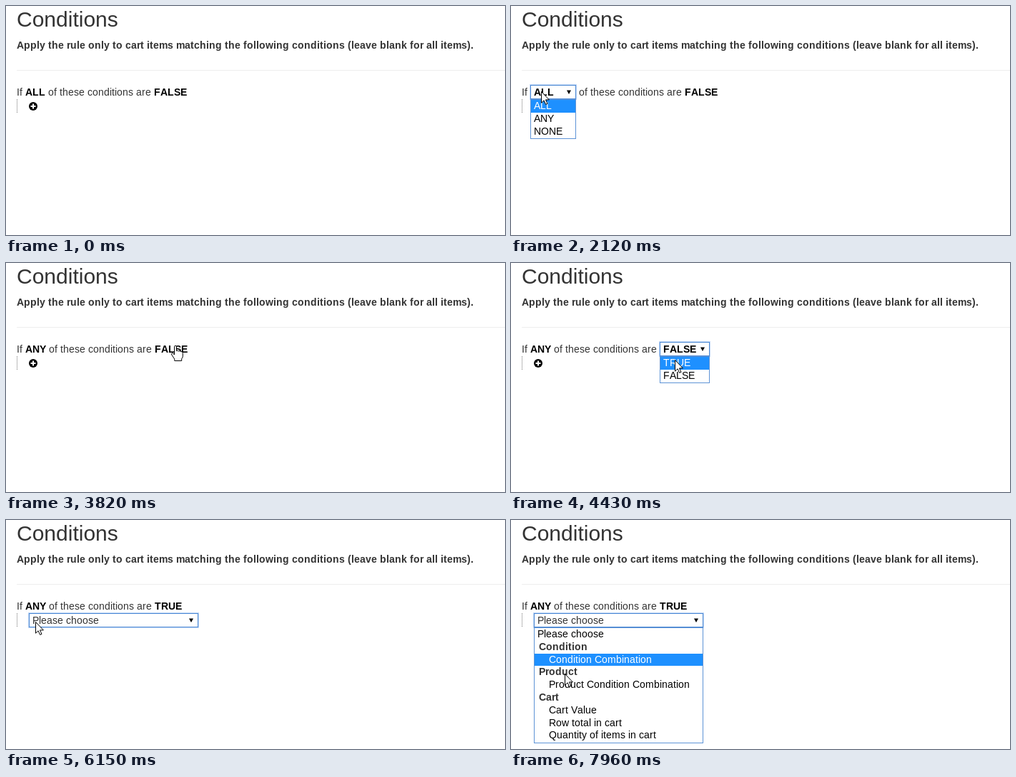
Recreate the animation shown at these times as an HTML page. Size 698x322 px, loop 8000 ms.

```html
<!DOCTYPE html>
<html lang="en">
<head>
<meta charset="utf-8">
<title>Conditions</title>
<style>
  html, body { margin: 0; width: 100%; height: 100%; overflow: hidden; background: #fff; }
  svg { display: block; font: 14px "Liberation Sans", Arial, sans-serif; }
  text { white-space: pre; fill: #333; }
  .b { font-weight: bold; }
  .k { fill: #000; }
  .w { fill: #fff; }
  rect { shape-rendering: crispEdges; }
</style>
</head>
<body>
<svg width="698" height="322" viewBox="0 0 698 322">
  <text x="15" y="29" font-size="30">Conditions</text>
  <g id="intro"></g>
  <rect x="15" y="90" width="683" height="1" fill="#eee"/>
  <path d="M15.5 131V151" stroke="#777" stroke-dasharray="1 1"/>
  <g id="form"></g>
  <g id="cursor" stroke="#000" fill="#fff" stroke-linejoin="round">
    <path id="arrow" d="M.5 .5V16.2L4.1 12.8 6.6 18.4 9 17.4 6.5 11.9H11.4Z"/>
    <path id="hand" d="M-1.5 13V1.8a1.5 1.5 0 0 1 3 0V7.5q1.5-1.2 3 .4 1.6-.9 3 .6 2.8-.4 2.8 2V15q0 2-1.6 3.6V21.5H-1.2V19.2L-5.2 13q-.9-2 .8-2.4 1.2-.2 2.9 2.4Z"/>
  </g>
</svg>
<script>
const LOOP = 8000;
const TICK = 77;   // the pointer moves once per tick
const ROW = 17.8;  // height of a list row
const $ = id => document.getElementById(id);
const pen = document.createElement('canvas').getContext('2d');

const MODES = ['ALL', 'ANY', 'NONE'];
const VALUES = ['TRUE', 'FALSE'];
// '#' marks a group title, '>' a member of a group
const KINDS = ['Please choose', '#Condition', '>Condition Combination', '#Product',
  '>Product Condition Combination', '#Cart', '>Cart Value', '>Row total in cart',
  '>Quantity of items in cart'];

// Each entry either brings the pointer to a point or changes the form
const SCRIPT = [
  { at: 0, mode: 'ALL', value: 'FALSE', field: '', open: false },
  { at: 1090, to: [33, 112] },
  { at: 1470, to: [42, 120] },
  { at: 1710, field: 'mode' },
  { at: 2120, open: true },
  { at: 2410, to: [45, 160] },
  { at: 2740, mode: 'ANY', open: false },
  { at: 3200, to: [112, 175] },
  { at: 3280, field: '' },
  { at: 3510, to: [174, 156] },
  { at: 3820, to: [237, 116] },
  { at: 4050, field: 'value' },
  { at: 4280, open: true },
  { at: 4430, to: [229, 136] },
  { at: 4830, to: [232, 146] },
  { at: 5140, value: 'TRUE', open: false },
  { at: 5530, to: [150, 154] },
  { at: 5530, field: '' },
  { at: 6000, to: [41, 143] },
  { at: 6150, field: 'kind' },
  { at: 6470, open: true },
  { at: 6960, to: [69, 187] },
  { at: 7490, to: [73, 213] },
  { at: 7960, to: [75, 216] }
];

// Longer ways take more ticks
function pointer(t) {
  let x = 263, y = 355;
  for (const { at, to } of SCRIPT) {
    if (!to) continue;
    const dx = to[0] - x, dy = to[1] - y;
    const ticks = Math.round((150 + 1.6 * Math.hypot(dx, dy)) / TICK);
    const left = Math.max(0, Math.ceil((at - t) / TICK));
    if (left >= ticks) break;
    const p = 1 - (left / ticks) ** 1.5;
    x += dx * p;
    y += dy * p;
  }
  return [Math.round(x), Math.round(y)];
}

const stateAt = t => Object.assign({}, ...SCRIPT.filter(s => !s.to && s.at <= t));

// Whole-pixel advance of one 14px glyph
function advance(ch, bold) {
  pen.font = (bold ? 'bold ' : '') + '1400px "Liberation Sans", Arial, sans-serif';
  return Math.round(pen.measureText(ch).width / 100);
}

function text(x, y, str, cls = '') {
  const xs = [];
  for (const ch of str) {
    xs.push(x);
    x += advance(ch, cls.includes('b'));
  }
  return { svg: `<text class="${cls}" x="${xs.join(' ')}" y="${y}">${str}</text>`, end: x };
}

const box = (x, y, w, h, fill, stroke = 'none') =>
  `<rect x="${x}" y="${y}" width="${w}" height="${h}" fill="${fill}" stroke="${stroke}"/>`;

function select(x, y, w, label, cls) {
  return box(x - .5, y - .5, w + 1, 21, 'none', '#c3d9f7') +
    box(x + .5, y + .5, w - 1, 19, '#fff', '#4a87d3') +
    text(x + 5, y + 15, label, cls).svg +
    `<path d="M${x + w - 13} ${y + 7.5}h6l-3 5.5z"/>`;
}

// The row under the pointer; titles leave the row above them active
function activeRow(items, chosen, top, y) {
  let row = Math.min(items.length - 1, Math.floor((y - top) / ROW));
  if (row < 0) return items.indexOf(chosen);
  while (items[row][0] === '#') row--;
  return row;
}

function list(x, y, w, items, chosen, py) {
  const active = activeRow(items, chosen, y, py);
  const edge = i => Math.round(y + 1 + i * ROW);
  let svg = box(x + .5, y + .5, w - 1, Math.ceil(items.length * ROW + 1), '#fff', '#5d93d6');
  svg += box(x + 1, edge(active), w - 2, edge(active + 1) - edge(active), '#1e90ff');
  items.forEach((item, i) => {
    const group = item[0] === '#', member = item[0] === '>';
    const indent = group ? 7 : member ? 21 : 5;
    const cls = group ? 'b' : i === active ? 'w' : 'k';
    svg += text(x + indent, edge(i) + 13, item.replace(/^[#>]/, ''), cls).svg;
  });
  return svg;
}

const PLUS = '<circle cx="38" cy="141" r="6"/><path d="M34.5 141h7M38 137.5v7" stroke="#fff" stroke-width="2"/>';

// Draws the form and returns its clickable areas as [x, y, width, height]
function drawForm({ mode, value, field, open }, py) {
  const links = [];
  let svg = '', popup = '', x = 15;
  const put = (str, cls) => {
    const part = text(x, 126, str, cls);
    svg += part.svg;
    x = part.end;
  };
  const choice = (name, label, w, items) => {
    const left = x;
    if (field === name) {
      svg += select(x, 111, w, label, 'b k');
      if (open) popup = list(x, 131, w, items, label, py);
      x += w;
    } else {
      put(label, 'b k');
      links.push([left, 111, x - left, 19]);
    }
  };
  put('If ');
  choice('mode', mode, 64, MODES);
  put(' of these conditions are ');
  choice('value', value, 70, VALUES);
  if (field === 'kind') {
    svg += select(32, 131, 237, KINDS[0], '');
    if (open) popup = list(32, 151, 237, KINDS, KINDS[0], py);
  } else {
    svg += PLUS;
    links.push([32, 135, 12, 12]);
  }
  $('form').innerHTML = svg + popup;
  return links;
}

$('intro').innerHTML = text(15, 60,
  'Apply the rule only to cart items matching the following conditions (leave blank for all items).', 'b').svg;

let lastKey = '', links = [];

function render(t) {
  const [x, y] = pointer(t);
  const state = stateAt(t);
  const key = JSON.stringify([state, y]);
  if (key !== lastKey) {
    links = drawForm(state, y);
    lastKey = key;
  }
  const over = links.some(([l, top, w, h]) => x >= l && x < l + w && y >= top && y < top + h);
  $('cursor').setAttribute('transform', `translate(${x} ${y})`);
  $('hand').style.display = over ? '' : 'none';
  $('arrow').style.display = over ? 'none' : '';
}

const begin = performance.now();
function tick() {
  render((performance.now() - begin) % LOOP);
  requestAnimationFrame(tick);
}
tick();
</script>
</body>
</html>
```
